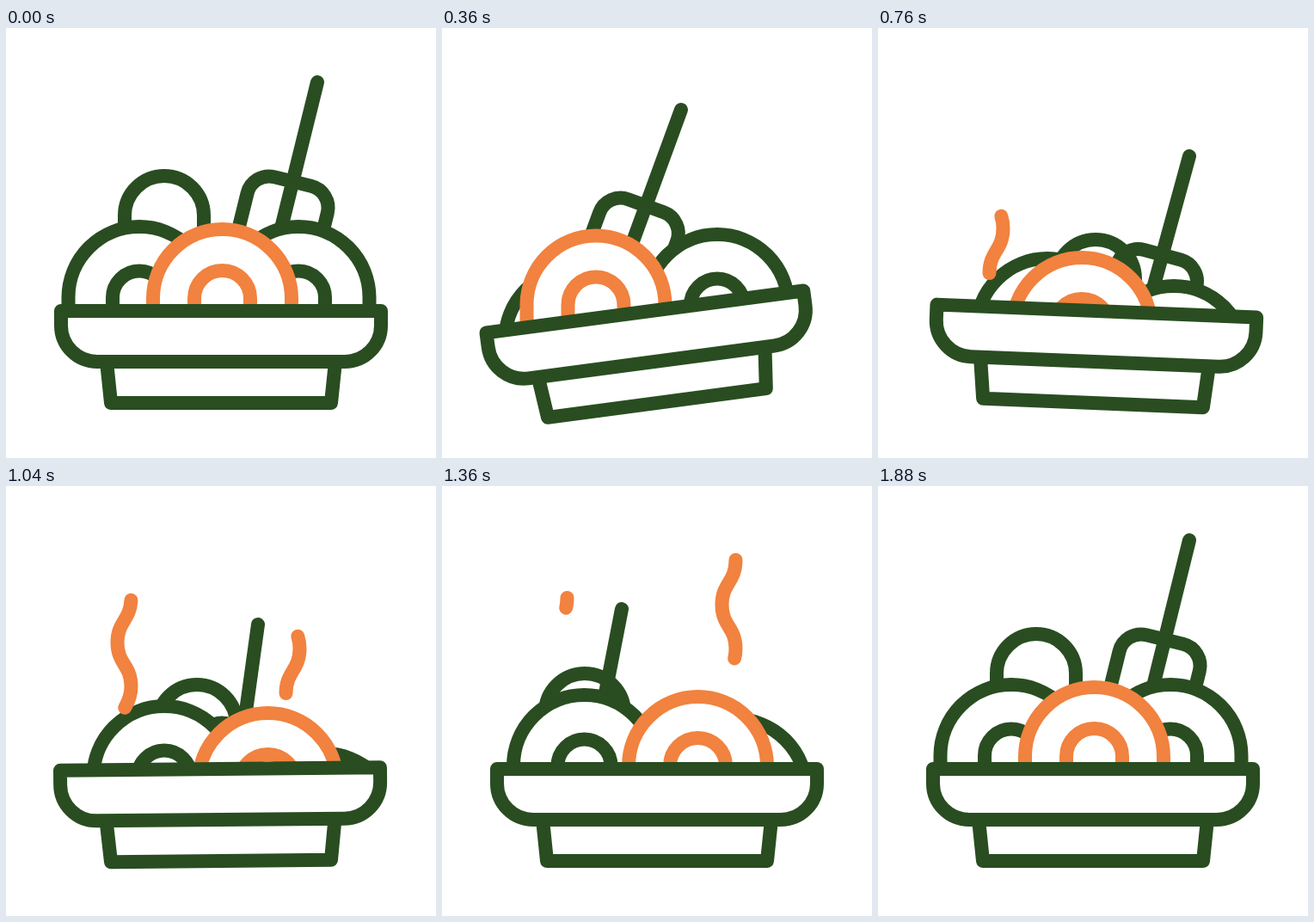
Animation, 500 px wide and 500 px high, one loop 2000 ms. Source, as an HTML page:

```html
<!DOCTYPE html>
<html lang="en">
<head>
<meta charset="utf-8">
<title>Bowl</title>
<style>
  html, body { margin: 0; width: 100%; height: 100%; overflow: hidden; background: #fff; }
  svg { display: block; width: 100%; height: 100%; }
  .line { fill: none; stroke: #294d21; stroke-width: 16; stroke-linecap: round; stroke-linejoin: round; }
  .solid { fill: #fff; }
  .orange { stroke: #f1823f; }
</style>
</head>
<body>
<svg viewBox="0 0 500 500">
  <clipPath id="aboveRim"><rect id="cut" x="-200" y="-300" width="900" height="629"/></clipPath>
  <g clip-path="url(#aboveRim)">
    <path id="ball" class="line"/>
    <path id="fork" class="line" d="M0 0V200M-48 200V145A26 26 0 0 1 -22 119H22A26 26 0 0 1 48 145V200"/>
    <path id="left" class="line solid"/>
    <path id="right" class="line solid"/>
    <path id="front" class="line solid orange"/>
  </g>
  <g id="bowl">
    <path class="line solid" d="M117 388L122 436H378L383 388"/>
    <path class="line solid" d="M64 329H436V346A42 42 0 0 1 394 388H106A42 42 0 0 1 64 346Z"/>
  </g>
  <path id="steam1" class="line orange"/>
  <path id="steam2" class="line orange" transform="translate(196 -44)"/>
</svg>
<script>
const STEP = 40, LAST = 1880, LOOP = 2000;
const KEYS = [0, 360, 760, 1040, 1360, 1640, 1880];
const el = id => document.getElementById(id);

// Offsets from the rest position at each key time.
const parts = {
  ball:  { x: 184,   y: 218,   dx: [0, 4, 69, 38, -18, -10, 0],      dy: [0, 76, 74, 59, 46, 15, 0],  radii: [46] },
  left:  { x: 155,   y: 313.5, dx: [0, 1, 42, 29, 10.5, 0, 0],       dy: [0, 49, 37, 25, 12, 0.5, 0], radii: [82.5, 31] },
  right: { x: 340,   y: 313.5, dx: [0, -20, 4, 30, 1, -18, 0],       dy: [0, 9, 69, 80, 40, 14, 0],   radii: [82.5, 31] },
  front: { x: 251.5, y: 314.5, dx: [0, -72.5, -14.5, 53, 46, 7.5, 0], dy: [0, 7.5, 33, 30, 11, 2, 0],  radii: [80.5, 32.5] },
  fork:  { x: 362,   y: 63,    dx: [0, -84, 0, -69, -153, -41, 0],   dy: [0, 32, 86, 98, 80, 21, 0],
           turn: [13.9, 20.1, 15.3, 7.9, 11, 12.7, 13.9] }
};
const tilts = [[0, 0], [440, -8.2], [680, 4.3], [890, -2], [1120, 0]];

const arch = r => `M${-r} 100V0A${r} ${r} 0 0 1 ${r} 0V100`;
for (const id in parts) {
  if (parts[id].radii) el(id).setAttribute('d', parts[id].radii.map(arch).join(''));
}
const STEAM = 'M129.5 285C129.5 260 145.5 258 145.5 233S129.5 207 129.5 182S145.5 156 145.5 130';
const steams = ['steam1', 'steam2'].map(el);
steams.forEach(s => s.setAttribute('d', STEAM));
const steamLength = steams[0].getTotalLength();

function ease(t, from, to) {
  const p = Math.min(1, Math.max(0, (t - from) / (to - from)));
  return Math.sin(p * Math.PI / 2) ** 2;
}

// Smooth curve through the key values, at rest at both ends.
function spline(values, t) {
  const end = KEYS.length - 1;
  let i = 0;
  while (i < end - 1 && t >= KEYS[i + 1]) i++;
  const slope = k => k === 0 || k === end ? 0 :
    (values[k + 1] - values[k - 1]) / (KEYS[k + 1] - KEYS[k - 1]);
  const h = KEYS[i + 1] - KEYS[i], p = (t - KEYS[i]) / h, q = 1 - p;
  return values[i] * q * q * (1 + 2 * p) + values[i + 1] * p * p * (1 + 2 * q)
    + h * p * q * (slope(i) * q - slope(i + 1) * p);
}

function tiltAt(t) {
  let angle = 0;
  for (let i = 1; i < tilts.length; i++) {
    angle += (tilts[i][1] - tilts[i - 1][1]) * ease(t, tilts[i - 1][0], tilts[i][0]);
  }
  return angle;
}

function drawSteam(path, t) {
  const head = ease(t, 490, 1090), tail = ease(t, 880, 1460);
  const length = (head - tail) * steamLength;
  path.style.display = length > 0.01 ? '' : 'none';
  path.setAttribute('stroke-dasharray', `${length} 1000`);
  path.setAttribute('stroke-dashoffset', -tail * steamLength);
}

function draw(t) {
  const tilt = `rotate(${tiltAt(t)} 250 436.5)`;
  el('bowl').setAttribute('transform', tilt);
  el('cut').setAttribute('transform', tilt);
  for (const id in parts) {
    const { x, y, dx, dy, turn } = parts[id];
    const angle = turn ? spline(turn, t) : 0;
    el(id).setAttribute('transform',
      `translate(${x + spline(dx, t)} ${y + spline(dy, t)}) rotate(${angle})`);
  }
  steams.forEach((path, i) => drawSteam(path, t - i * 280));
}

const start = performance.now();
function tick() {
  const t = (performance.now() - start) % LOOP;
  draw(Math.min(LAST, Math.floor(t / STEP) * STEP));
  requestAnimationFrame(tick);
}
tick();
</script>
</body>
</html>
```
